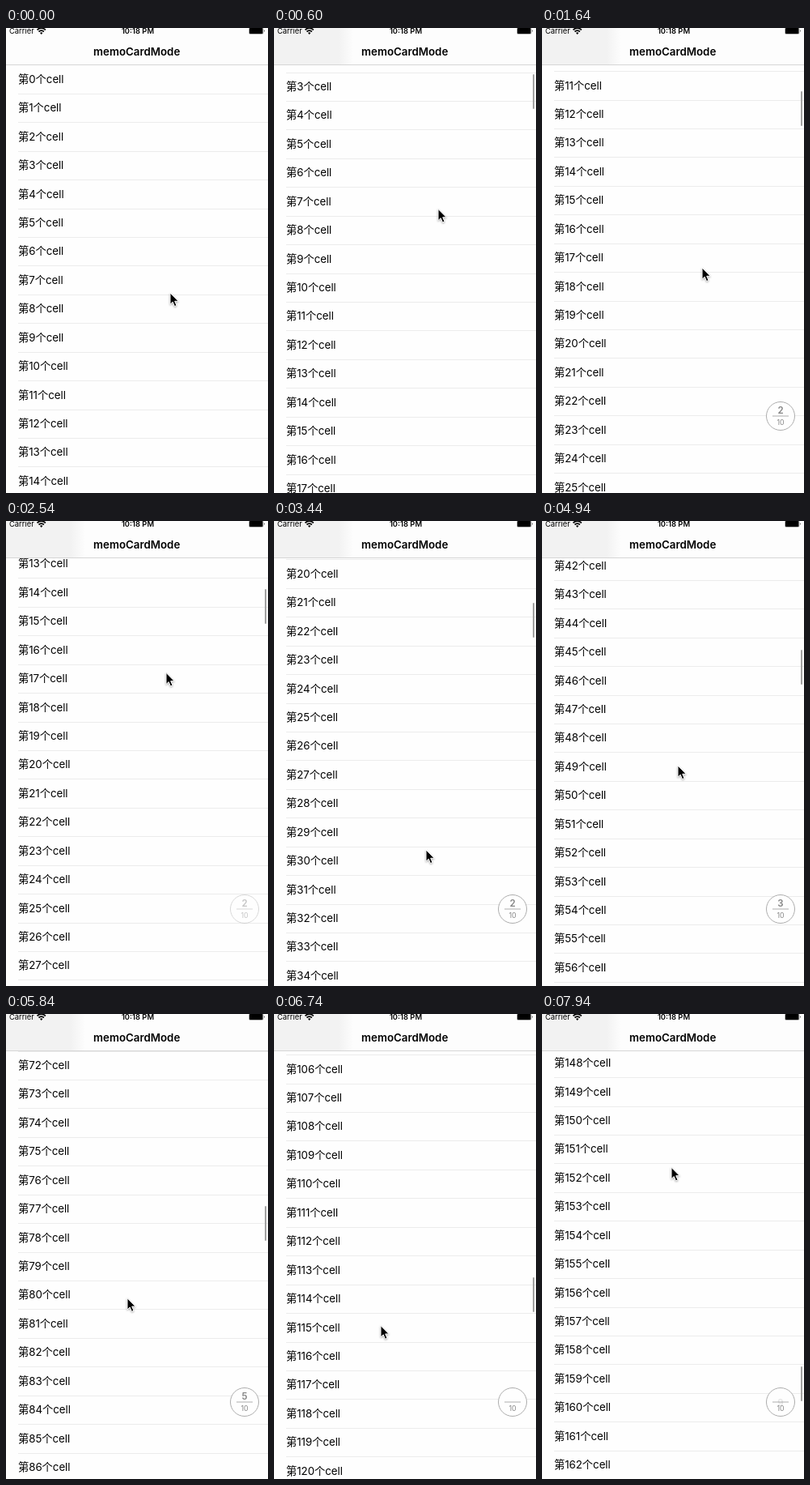
Write an HTML page that moves like this. It is 324 by 574 pixels and loops after 8000 ms.

```html
<!DOCTYPE html>
<html lang="zh-CN">
<head>
<meta charset="utf-8">
<title>List with page badge</title>
<style>
  html, body { margin: 0; width: 100%; height: 100%; overflow: hidden; background: #fefefe; }
  #stage {
    position: relative; width: 324px; height: 574px; overflow: hidden; background: #fefefe; color: #000;
    font-family: Inter, "Noto Sans CJK SC", "Noto Sans CJK", sans-serif;
  }
  .row {
    position: absolute; left: 15px; right: 0; top: 0; height: 36px; box-sizing: border-box;
    border-bottom: 1px solid #ececec; font-size: 13.3px; line-height: 35px;
    letter-spacing: -.05px; white-space: nowrap;
  }
  #bar {
    position: absolute; left: 0; top: 0; width: 324px; height: 45px;
    background: #fdfdfd; border-bottom: 1px solid #d6d6d6;
  }
  #tint {
    position: absolute; left: 0; top: 0; width: 110px; height: 45px;
    background: linear-gradient(90deg, #f2f2f2 80px, #fdfdfd 98px);
  }
  svg { position: absolute; left: 0; top: 0; }
  text { text-anchor: middle; }
  #thumb {
    position: absolute; left: 320px; top: 0; width: 2px; height: 43px;
    border-radius: 1px; background: #a2a2a2;
  }
</style>
</head>
<body>
<div id="stage">
  <div id="list"></div>
  <div id="thumb"></div>
  <div id="bar"><div id="tint"></div></div>
  <svg width="324" height="574" viewBox="0 0 324 574">
    <text x="4" y="7.2" font-size="9.4" style="text-anchor:start">Carrier</text>
    <g fill="none" stroke="#000" stroke-width="1.7">
      <path d="M38.5 2.3Q43.7 -2.3 48.9 2.3"/>
      <path d="M40.5 4.5Q43.7 1.7 46.9 4.5"/>
    </g>
    <path d="M42 6Q43.7 4.6 45.4 6L43.7 8Z"/>
    <text x="163" y="7.2" font-size="9.4" font-weight="600">10:18 PM</text>
    <rect x="300.5" y="-.5" width="17.5" height="8" rx="1.6" fill="none" stroke="#999" stroke-width=".7"/>
    <rect x="301" width="16.5" height="7" rx=".7"/>
    <path d="M319 2.2q1.4 1.3 0 2.7z"/>
    <text x="161.7" y="33.5" font-size="13.3" font-weight="600">memoCardMode</text>
    <g id="badge">
      <circle cx="295" cy="479" r="17.5" fill="#fefefe" stroke="#adadad"/>
      <path d="M285 479H305" stroke="#adadad"/>
      <text id="page" x="295" font-size="11.5" font-weight="600" fill="#858585"></text>
      <text x="295" y="489.5" font-size="8.8" fill="#858585">10</text>
    </g>
    <path id="cursor" d="M0 0V14.2L3.2 11.2L5.5 16.6L8 15.5L5.7 10.3H10.2Z" stroke="#fff" style="filter:drop-shadow(0 1px 1px #0005)"/>
  </svg>
</div>
<script>
const LOOP = 8000, TOP = 45.8, PITCH = 35.43, VIEW = 528.2, PER_PAGE = 20;
const GLIDE = 1200, DRAG = 400, LIFT = 124;

// Each flick: start time, distance scrolled, where the pointer takes hold
const flicks = [
  { at: 303, dist: 382, x: 203, y: 327 },
  { at: 2228, dist: 324.6, x: 198, y: 296 },
  { at: 3440, dist: 639.8, x: 188, y: 406 },
  { at: 4740, dist: 1100, x: 168, y: 364 },
  { at: 5690, dist: 1263, x: 150, y: 390 },
  { at: 6640, dist: 1200, x: 132, y: 404 },
  { at: 7640, dist: 1305, x: 160, y: 294 },
];

const $ = id => document.getElementById(id);
const clamp = v => Math.max(0, Math.min(1, v));
const smooth = v => (v = clamp(v)) * v * (3 - 2 * v);
const mix = (a, b, p) => a + (b - a) * p;

// Quick pull, then a long slowing glide
const glide = u => 1 - (1 - clamp(u) ** 1.7) ** 3;
const scroll = t => flicks.reduce((sum, f) => sum + f.dist * glide((t - f.at) / GLIDE), 0);
const pageAt = t => Math.floor((VIEW + scroll(t)) / PITCH / PER_PAGE) + 1;

// Fades in after each flick starts and out once the list has rested
const shownBy = (t, delay, fade) => Math.max(...flicks.map(f =>
  Math.min(clamp((t - f.at - delay) / fade), clamp((f.at + 1900 - t) / 400))));

// Pull up during the drag, then travel to the next hold
function pointer(t) {
  const i = Math.max(0, flicks.findLastIndex(f => f.at <= t));
  const f = flicks[i], next = flicks[i + 1] || f, age = t - f.at;
  const back = smooth((age - DRAG) / 500);
  return [mix(f.x, next.x, back), mix(f.y - LIFT * smooth(age / DRAG), next.y, back)];
}

const rows = Array.from({ length: 17 }, () => {
  const row = document.createElement('div');
  row.className = 'row';
  return $('list').appendChild(row);
});

function draw(t) {
  const s = scroll(t), first = Math.floor(s / PITCH);
  rows.forEach((row, i) => {
    const n = first + i;
    row.textContent = `第${n}个cell`;
    row.style.transform = `translateY(${Math.round(TOP + n * PITCH - s)}px)`;
  });
  $('thumb').style.transform = `translateY(${Math.round(49.5 + s * .0735)}px)`;
  $('thumb').style.opacity = shownBy(t, 0, 300);
  $('tint').style.opacity = t < 150 ? 0 : 1;
  $('cursor').setAttribute('transform', `translate(${pointer(t)})`);

  // A new page number rises from the divider
  const page = pageAt(t);
  let age = 0;
  while (age < 400 && pageAt(t - age) === page) age += 10;
  const p = clamp((age - 30) / 200);
  $('page').textContent = page;
  $('page').setAttribute('y', 489 - 13 * p * (2 - p));
  $('page').setAttribute('opacity', p);
  $('badge').setAttribute('opacity', page > 1 ? shownBy(t, 170, 310) : 0);
}

// The picture advances in steps of 150 ms
function hold(t) {
  const start = t < 740 ? 0 : 740;
  return start + Math.floor((t - start) / 150) * 150;
}

const begin = performance.now();
let shown = -1;
function tick() {
  const t = hold((performance.now() - begin) % LOOP);
  if (t !== shown) draw(shown = t);
  requestAnimationFrame(tick);
}
tick();
</script>
</body>
</html>
```
